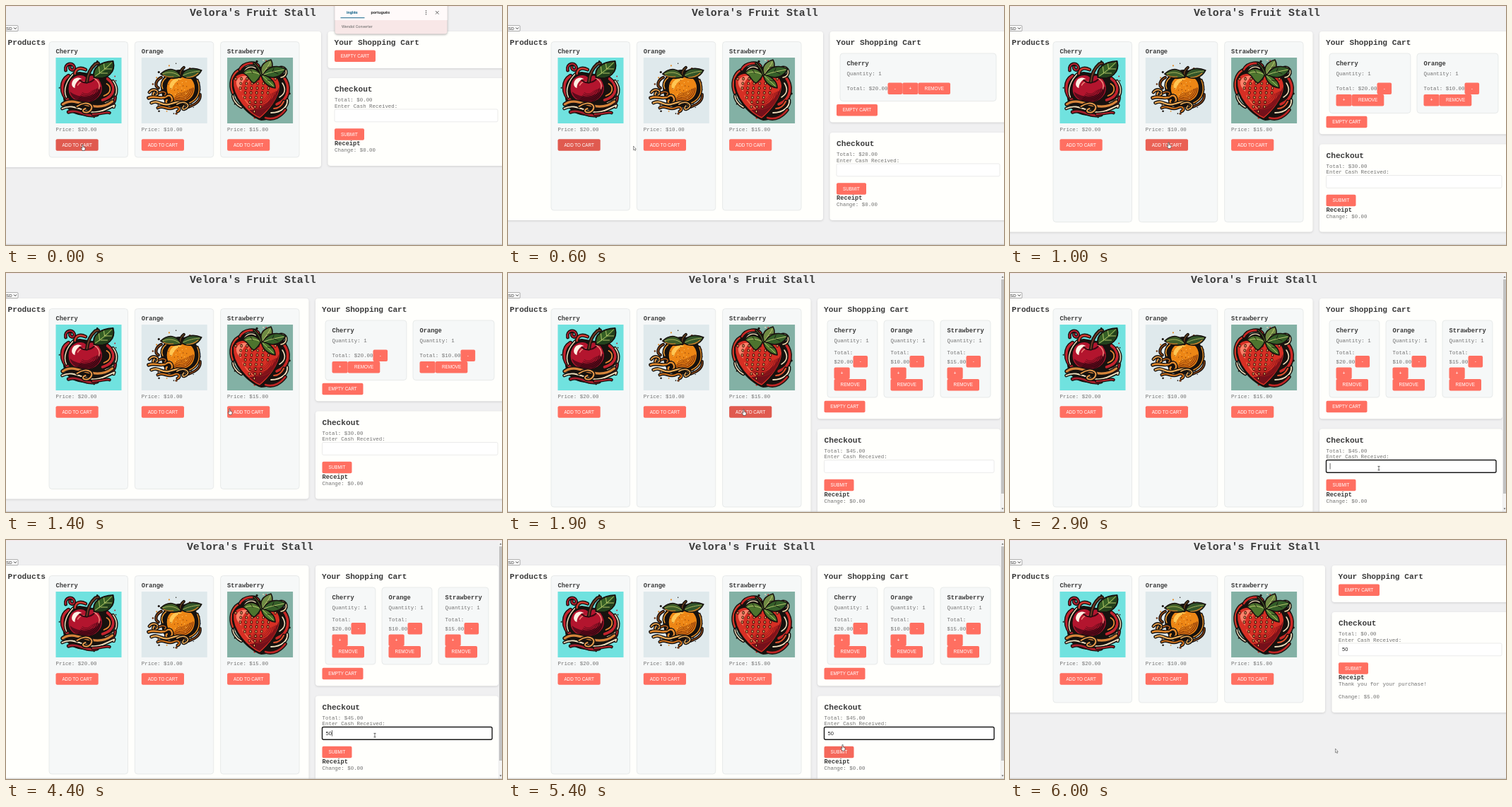
Recreate the animation shown at these times as an HTML page. Size 702x338 px, loop 6.1 s.

```html
<!DOCTYPE html>
<html lang="en">
<head>
<meta charset="utf-8">
<title>Fruit stall</title>
<style>
html, body { margin: 0; width: 100%; height: 100%; overflow: hidden; background: #f0f0f1; }
svg { display: block; width: 100%; height: 100%; }
text { font: 7.45px "Courier New", "Liberation Mono", monospace; fill: #727272; white-space: pre; }
.h1, .h2, .h3 { font-weight: bold; fill: #3a3a3a; }
.h1 { font-size: 14.9px; }
.h2 { font-size: 11.17px; }
.h3 { font-size: 8.7px; }
.ui { font: 6.3px Arial, "Liberation Sans", sans-serif; fill: #fff; }
.in { font: 7.45px Arial, "Liberation Sans", sans-serif; fill: #222; }
.tab { font: bold 5.8px Roboto, sans-serif; fill: #333; }
.note { font: 5.5px Roboto, sans-serif; fill: #666; }
.panel { fill: #fffffc; filter: drop-shadow(0 1px 1.5px #0002); }
.card { fill: #f6f8f8; stroke: #dcdfdf; stroke-width: .6; }
.line { fill: none; stroke-linecap: round; stroke-linejoin: round; }
</style>
</head>
<body>
<svg id="stage" viewBox="0 0 702 338">
  <defs id="art"></defs>
  <g id="page"></g>
  <g id="cursor"></g>
</svg>
<script>
const LOOP = 6100, STEP = 100;
const INK = '#17120f', CREAM = '#f0dfbd', CORAL = [255, 111, 97], DARK = [224, 90, 79];
const $ = id => document.getElementById(id);
const clamp = v => Math.max(0, Math.min(1, v));

const rect = (x, y, w, h, attrs = '', r = 0) =>
  `<rect x="${x}" y="${y}" width="${w}" height="${h}" rx="${r}" ${attrs}/>`;
const text = (x, y, s, cls = '', attrs = '') =>
  `<text x="${x}" y="${y}" class="${cls}" ${attrs}>${s}</text>`;
const path = (d, fill, stroke = INK, w = 1.2) =>
  `<path d="${d}" fill="${fill}" stroke="${stroke}" stroke-width="${w}" stroke-linejoin="round"/>`;
const line = (d, c, w = 1) => `<path class="line" d="${d}" stroke="${c}" stroke-width="${w}"/>`;
const ribbon = (d, c, w) => line(d, INK, w + 2.8) + line(d, c, w);
const dot = (x, y, r, c) => `<circle cx="${x}" cy="${y}" r="${r}" fill="${c}"/>`;

// Seeded drops scattered on a ring around the fruit
function drops(seed, n, r0, r1, colors) {
  const rnd = () => (seed = seed * 16807 % 2147483647) / 2147483647;
  let out = '';
  for (let i = 0; i < n; i++) {
    const a = rnd() * 6.28, r = r0 + rnd() * (r1 - r0);
    out += dot(46 + r * Math.cos(a), 45 + r * Math.sin(a), .5 + rnd() * 1.1, colors[i % colors.length]);
  }
  return out;
}

// Curved strokes that follow the lower right side of a round body
function shade(cx, cy, r, c) {
  let out = '';
  for (let i = 0; i < 6; i++) {
    const k = r - 2 - i * 2.4, w = 1.6 - i * .2;
    out += line(`M${cx + k} ${cy + i}A${k} ${k} 0 0 1 ${cx - k * .5} ${cy + k * .86}`, c, w);
  }
  return out;
}

function cherry() {
  return rect(0, 0, 93, 93, 'fill="#70e2df"') +
    drops(11, 26, 35, 42, [INK, '#b9202e', CREAM]) +
    path('M12 64C6 44 14 22 34 20L58 24C80 26 86 42 80 58C76 76 58 84 42 82C28 82 16 76 12 64Z', INK, 'none') +
    ribbon('M20 62C4 50 8 32 18 26', '#c3242f', 3.4) +
    ribbon('M15 56C10 46 15 32 26 22', CREAM, 1.5) +
    ribbon('M14 18C12 8 24 6 26 13S18 18 20 13', '#b81f31', 2) +
    ribbon('M27 23C28 14 36 14 42 17', '#cf3b31', 2.4) +
    ribbon('M66 60C86 54 84 38 73 30', '#c3242f', 3.6) +
    ribbon('M70 64C90 58 88 42 81 33', CREAM, 1.5) +
    ribbon('M68 54C80 50 78 40 72 37', '#e78a36', 1.8) +
    ribbon('M68 70C80 70 84 62 84 56', '#a71f2b', 2) +
    path('M43 27C35 20 17 25 17 44C17 58 31 66 43 64C58 64 68 52 66 40C62 24 50 22 43 27Z', '#b3152e', INK, 2) +
    path('M20 48C22 58 32 63 43 62C57 61 65 52 64 42C58 54 36 61 20 48Z', '#5d0a1b', 'none') +
    shade(42, 42, 23, '#3c0712') +
    path('M23 35C25 28 32 27 37 30C31 31 27 37 27 43C23 42 22 38 23 35Z', '#fff0e4', 'none') +
    line('M54 29C61 33 63 39 61 44M31 39C33 35 37 33 40 34', '#f2857a', 1.5) +
    line('M34 32C39 37 49 36 54 31', '#3c0712', 2.2) +
    ribbon('M44 34C45 24 48 16 56 9L60 8', '#6e3a26', 2.2) +
    path('M54 28C51 15 62 6 81 5C85 20 74 32 54 28Z', '#355f25', INK, 2) +
    path('M56 27C66 22 74 16 80 7C82 20 74 30 56 27Z', '#213f1c', 'none') +
    line('M56 26C64 21 72 14 79 7M62 22L61 13M69 16L68 9M64 22L73 22M70 16L79 16', '#c3d271', .9) +
    ribbon('M10 66C28 52 54 82 80 62', '#d8853b', 3.4) +
    ribbon('M9 72C28 62 44 84 66 75S82 66 82 70', CREAM, 1.9) +
    ribbon('M18 77C30 72 42 85 58 81', '#a81f2c', 2.6) +
    ribbon('M30 69C46 58 58 70 46 77C38 79 36 74 42 72', '#e59a4b', 2) +
    ribbon('M52 80C64 80 72 76 76 78', '#c3242f', 1.8);
}

function orange() {
  return rect(0, 0, 93, 93, 'fill="#dfe9ec"') +
    drops(29, 34, 28, 38, [INK, '#e28a24', '#6b3514']) +
    path('M28 48C24 30 36 18 54 17C76 18 86 34 80 52C74 66 58 74 42 70C34 66 30 60 28 48Z', INK, 'none') +
    ribbon('M68 64C82 58 84 44 79 32', '#e58d25', 1.4) +
    ribbon('M66 70C78 66 84 60 83 52', '#8c4517', 1.2) +
    ribbon('M28 28C20 32 18 40 24 43', '#8c4517', 1.5) +
    ribbon('M35 28C28 34 28 40 30 44', '#ef9a2e', 1.6) +
    path('M55 24C67 22 77 32 76 44C75 57 66 64 54 63C42 63 35 54 35 43C35 32 44 23 55 24Z', '#ed8615', INK, 1.8) +
    shade(55, 43, 20, '#8f3d0b') +
    path('M40 38C43 30 51 28 58 30C50 32 45 37 43 45C40 44 39 41 40 38Z', '#ffc652', 'none') +
    Array.from({length: 26}, (_, i) => dot(54 + (3 + i * .55) * Math.cos(i * 2.4),
      43 + (3 + i * .55) * Math.sin(i * 2.4), .6, i % 2 ? '#74300a' : '#ffd075')).join('') +
    ribbon('M55 27C54 22 56 17 60 14', '#6d421f', 1.4) +
    path('M56 27C50 15 38 13 27 23C36 29 46 31 56 27Z', '#3f5e29', INK, 1.6) +
    path('M57 26C60 15 73 13 85 18C80 28 68 33 57 26Z', '#33552a', INK, 1.6) +
    line('M54 26C46 20 38 20 30 23M59 25C67 21 75 20 82 19', '#b4bc60', .9) +
    line('M45 27C38 28 34 27 31 25M64 28C72 28 77 25 80 22', '#d98029', 1.2) +
    ribbon('M11 49C17 42 26 47 22 52S14 53 18 49', '#eca14a', 1.8) +
    ribbon('M10 57C20 53 28 60 35 55S46 60 41 64S33 62 36 60', '#e88c2c', 2.4) +
    ribbon('M14 64C24 59 28 69 39 66S56 60 64 67', '#f0ae58', 2.2) +
    ribbon('M23 71C31 66 36 75 45 71S56 74 51 76', '#df7b20', 1.9) +
    ribbon('M50 66C60 60 70 66 64 71S57 71 60 68', '#efb15f', 1.5) +
    ribbon('M25 50C31 46 37 50 33 53', '#b9601a', 1.6);
}

function strawberry() {
  let seeds = '';
  for (let row = 0; row < 8; row++) {
    const y = 30 + row * 6.6, half = 28 - row * 3.2;
    for (let x = -half + (row % 2) * 4; x <= half; x += 8)
      seeds += `<ellipse cx="${40 + x}" cy="${y}" rx="1.3" ry="1.9" fill="#f5cf77" stroke="#4b0c0d" stroke-width="1.1"/>`;
  }
  return rect(0, 0, 93, 93, 'fill="#83b1a5"') +
    drops(47, 28, 36, 43, [INK, '#c92a27', CREAM]) +
    path('M8 46C4 28 14 12 34 12L64 14C84 16 92 38 86 58C82 78 66 88 48 89C32 84 14 66 8 46Z', INK, 'none') +
    ribbon('M70 66C90 58 88 38 80 28', '#c92926', 3.6) +
    ribbon('M74 56C84 50 82 42 78 36', CREAM, 1.6) +
    ribbon('M62 78C78 78 86 68 85 60', CREAM, 1.8) +
    ribbon('M54 85C66 89 76 82 82 74', '#bd2624', 2.6) +
    ribbon('M66 72C74 72 78 66 80 62', '#e0542f', 2) +
    ribbon('M8 50C3 38 6 24 16 18', '#d43829', 2.2) +
    ribbon('M20 70C12 66 8 58 8 54', CREAM, 1.5) +
    ribbon('M18 17C24 6 40 6 44 12', '#c92926', 2.6) +
    ribbon('M24 20C28 12 36 12 40 15', CREAM, 1.4) +
    ribbon('M76 28C88 26 84 12 75 14', '#efd5a6', 1.6) +
    path('M8 32C12 20 28 20 42 23C58 18 74 24 75 40C75 58 58 77 46 87C30 80 6 56 8 32Z', '#d62f24', INK, 2) +
    path('M73 42C72 59 58 74 46 84C41 82 35 78 31 74C50 74 66 59 73 42Z', '#74101a', 'none') +
    shade(44, 48, 27, '#8a151a') +
    path('M13 33C16 26 24 25 31 26C22 31 19 39 20 48C15 44 12 38 13 33Z', '#f9836a', 'none') +
    line('M22 54C26 62 32 68 37 72M34 30C29 33 27 38 27 43', '#f16a4c', 1.6) +
    seeds +
    path('M48 24C38 12 28 14 22 22C31 24 30 33 38 36C43 33 45 29 48 24Z', '#4d742e', INK, 1.6) +
    path('M49 24C45 13 51 6 62 3C67 13 62 21 49 24Z', '#6f8a44', INK, 1.6) +
    path('M50 24C59 11 72 10 83 16C77 27 66 32 50 24Z', '#355f29', INK, 1.6) +
    path('M48 24C58 25 68 33 68 43C57 41 50 35 48 24Z', '#4b752c', INK, 1.6) +
    line('M47 24C38 20 32 19 26 22M50 23C55 16 59 11 61 6M52 24C62 20 72 19 80 17M50 26L65 40', '#c8d478', .9) +
    line('M36 22L33 17M57 14L62 13M64 20L66 15M66 20L72 23M57 32L63 33', INK, .8) +
    ribbon('M48 24C46 17 43 12 38 8', '#56762f', 1);
}

const fruits = [
  {name: 'Cherry', price: '20.00', hover: [-300, 600]},
  {name: 'Orange', price: '10.00', hover: [800, 1100]},
  {name: 'Strawberry', price: '15.00', hover: [1400, 2100]}
];
$('art').innerHTML = [cherry, orange, strawberry]
  .map((draw, i) => `<g id="fruit${i}">${draw()}</g>`).join('');

// Layouts by number of items in the cart
const layouts = [
  {x: 455.5, split: 446, empty: 62.5, checkout: 102, bottom: 228, cards: []},
  {x: 455.5, split: 446, empty: 139, checkout: 179, bottom: 303, cards: [470], w: 221, h: 67.5},
  {x: 438, split: 428.5, empty: 155.7, checkout: 195.5, bottom: 319.5, cards: [452, 576], w: 115, h: 84.5},
  {x: 438, split: 428.5, empty: 180.7, checkout: 220.5, bottom: 345, cards: [452, 532, 612], w: 71, h: 109}
];

function button(x, y, w, label, hover = 0) {
  const c = CORAL.map((v, i) => Math.round(v + (DARK[i] - v) * hover));
  return rect(x, y, w, 16.6, `fill="rgb(${c})"`, 2) +
    text(x + w / 2, y + 10.4, label, 'ui', 'text-anchor="middle"');
}
const fade = (t, [on, off]) => clamp((t - on) / 300) - clamp((t - off) / 300);

function products(t, end) {
  return text(2.5, 54.5, 'Products', 'h2') + fruits.map((f, i) => {
    const x = 61 + i * 121.3, left = x + 9.5;
    return rect(x, 50.5, 111.5, end - 64.5, 'class="card"', 4) +
      text(left, 66.5, f.name, 'h3') +
      `<use href="#fruit${i}" x="${left}" y="73"/>` +
      text(left, 177, 'Price: $' + f.price) +
      button(left, 188.2, 60.2, 'ADD TO CART', fade(t, f.hover));
  }).join('');
}

function cartItem(x, f, n, w, h) {
  const a = x + 9.5;
  const head = rect(x, 67, w, h, 'class="card"', 4) +
    text(a, 83.5, f.name, 'h3') + text(a, 97.5, 'Quantity: 1');
  if (n === 3) return head + text(a, 115, 'Total:') + text(a, 127.5, '$' + f.price) +
    button(a + 27, 117, 20.6, '-') + button(a, 133.5, 22.2, '+') + button(a, 150, 45.5, 'REMOVE');
  const bx = n === 1 ? a + 78.7 : a, by = n === 1 ? 108.5 : 125;
  return head + text(a, 119, 'Total: $' + f.price) + button(a + 58, 108.5, 20.6, '-') +
    button(bx, by, 22.2, '+') + button(bx + 22.3, by, 45.5, 'REMOVE');
}

function checkout(t, L, n, paid, right) {
  const x = L.x + 9.5, y = L.checkout, w = (n > 2 ? 688 : 696) - x;
  const focus = t >= 2800 && t < 5600;
  const caret = focus && (t < 3600 || t >= 4400 && t < 5000);
  const typed = t >= 4400 ? '50' : '';
  const total = [0, 20, 30, 45][n];
  let out = rect(L.x, y, right - L.x, paid ? 142 : 124, 'class="panel"', 4) +
    text(x, y + 19, 'Checkout', 'h2') +
    text(x, y + 33, `Total: $${total}.00`) +
    text(x, y + 41.6, 'Enter Cash Received:') +
    rect(x, y + 44, w, 17.8, `fill="#fff" stroke="${focus ? '#1a1a1a' : '#ddd'}" stroke-width="${focus ? 1.4 : .6}"`, 2) +
    text(x + 5, y + 55.4, typed, 'in');
  if (caret) out += rect(x + (typed ? 13.6 : 5.2), y + 48.5, .7, 8.5, 'fill="#222"');
  out += button(x, y + 71.2, 42, 'SUBMIT', fade(t, [5300, 5700])) + text(x, y + 95.2, 'Receipt', 'h3');
  return out + (paid
    ? text(x, y + 104, 'Thank you for your purchase!') + text(x, y + 121.5, 'Change: $5.00')
    : text(x, y + 104, 'Change: $0.00'));
}

function scrollbar() {
  return rect(697.5, 1, 4.5, 336, 'fill="#f3f3f3"') + rect(698, 9, 4, 303, 'fill="#c2c2c2"') +
    path('M698.6 6.5L700 4.5L701.4 6.5Z', '#555', 'none') +
    path('M698.6 332.5L700 334.5L701.4 332.5Z', '#555', 'none');
}

function popup() {
  return `<g style="filter:drop-shadow(0 1px 1.5px #0005)">${rect(465.5, -8, 159, 47.5, 'fill="#f8e7e7"', 4)}</g>` +
    rect(465.5, 0, 159, 20, 'fill="#fffafa"') +
    text(482, 11.3, 'inglés', 'tab', 'style="fill:#17678c"') +
    text(516.5, 11.3, 'português', 'tab') +
    rect(473.5, 16.2, 34, 1, 'fill="#17678c"') +
    [6.8, 9.3, 11.8].map(y => dot(594.5, y, .7, '#444')).join('') +
    line('M608.3 7.3L612.3 11.3M612.3 7.3L608.3 11.3', '#444', .8) +
    text(475, 31, 'Wendol Converter', 'note');
}

function page(t) {
  const paid = t >= 5700;
  const n = paid || t < 200 ? 0 : t < 1000 ? 1 : t < 1700 ? 2 : 3;
  const L = layouts[n], end = paid ? 244 : L.bottom, right = n > 2 ? 697 : 712;
  return text(n > 2 ? 345.3 : 349.3, 14.2, "Velora's Fruit Stall", 'h1', 'text-anchor="middle"') +
    rect(-10, 27.7, 27, 7.8, 'fill="#fff" stroke="#767676" stroke-width=".6"', 1) +
    text(0, 34, 'SD', 'in', 'style="font-size:6.2px"') +
    line('M11.3 30.7L13 32.6L14.7 30.7', '#222', .9) +
    rect(-10, 36, L.split + 10, end - 36, 'class="panel"', 4) + products(t, end) +
    rect(L.x, 36, right - L.x, L.empty - 10.5, 'class="panel"', 4) +
    text(L.x + 9, 54.5, 'Your Shopping Cart', 'h2') +
    L.cards.map((x, i) => cartItem(x, fruits[i], n, L.w, L.h)).join('') +
    button(L.x + 9.5, L.empty, 58, 'EMPTY CART') +
    checkout(t, L, n, paid, right) +
    (n > 2 ? scrollbar() : '') +
    rect(0, 0, 702, 1, 'fill="#f5e6e8"') + rect(0, 336.8, 702, .8, 'fill="#bdbdbd"') +
    (t < 200 ? popup() : '');
}

// time, x, y
const track = [
  [0, 109, 200], [400, 109, 200], [600, 179, 201], [800, 222, 198], [1000, 225, 197],
  [1400, 317, 196], [1600, 334, 197], [2000, 334, 197], [2800, 522, 276],
  [5000, 522, 276], [5500, 462, 298], [LOOP, 462, 298]
];
const within = (t, spans) => spans.some(([a, b]) => t >= a && t < b);

function pointer(t) {
  const i = track.findIndex(k => k[0] > t), [t0, x0, y0] = track[i - 1], [t1, x1, y1] = track[i];
  const u = (t - t0) / (t1 - t0), x = x0 + (x1 - x0) * u, y = y0 + (y1 - y0) * u;
  const hand = within(t, [[0, 500], [800, 1100], [1400, 2100], [5300, 5700]]);
  const shape = hand
    ? path('M-1 4L-3 1.2L-2.1 .5L-1.1 1.4V-4H.2V-.8L3 .2V2.6L2.2 4.5H-1Z', '#fff', '#333', .6)
    : within(t, [[2700, 5200]])
      ? line('M-1.2 -2.6H1.2M0 -2.6V2.8M-1.2 2.8H1.2', '#333', .7)
      : path('M-1.5 -3V2.8L-.2 1.7L.8 3.7L1.6 3.3L.7 1.4H2.3Z', '#fff', '#555', .6);
  return `<g transform="translate(${x} ${y})">${shape}</g>`;
}

let last = -1;
function frame(now) {
  const t = Math.floor(now % LOOP / STEP) * STEP;
  if (t !== last) {
    $('page').innerHTML = page(t);
    $('cursor').innerHTML = pointer(t);
    last = t;
  }
  requestAnimationFrame(frame);
}
frame(performance.now());
</script>
</body>
</html>
```
